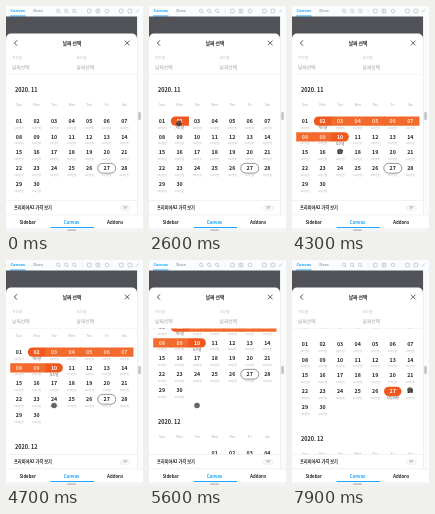
An HTML page with a canvas that plays this animation: 137x226 px, repeating every 8000 ms.

```html
<!DOCTYPE html>
<html lang="ko">
<head>
<meta charset="utf-8">
<style>
  html, body { margin: 0; width: 100%; height: 100%; overflow: hidden; background: #f6f8fb; }
  canvas { display: block; width: 137px; height: 226px; }
</style>
</head>
<body>
<canvas id="stage"></canvas>
<script>
const W = 137, H = 226, LOOP = 8000, STEP = 100;
const INK = '#222', MUTED = '#aaa', BLUE = '#1ea7fd', ORANGE = '#f0581f', RANGE = '#f26a2c';
const FONT = '"Noto Sans CJK KR", "Noto Sans CJK", "Noto Sans", sans-serif';
const UI_FONT = '"Open Sans", "Noto Sans", sans-serif';
const VIEW = { top: 68.5, bottom: 194.5 };
const ROW = 15.75, CELL = 17.55, LEFT = 4, RIGHT = 127.5;
const BAR_BOTTOM = 10.5, SHEET_TOP = 27.5;

const canvas = document.getElementById('stage');
const ctx = canvas.getContext('2d');
const ratio = window.devicePixelRatio || 1;
canvas.width = W * ratio;
canvas.height = H * ratio;

// Each key: time, then the values reached at that time.
const CURSOR = [
  [400, 3, 139], [700, 91, 118], [1000, 26, 92], [1300, 24, 91], [1600, 21, 67],
  [1900, 28, 122], [2100, 30, 117.5], [2600, 30, 117.5], [3100, 46, 131], [3200, 45, 131.5],
  [3400, 45, 131.5], [3700, 48, 145.5], [5900, 48, 145.5], [6300, 79, 131],
  [6600, 79, 131], [7000, 101, 131], [7600, 101, 131], [7900, 118, 130]
];
const SCROLL = [[4500, 0], [4700, 23], [4900, 46], [5200, 69], [5300, 71], [5400, 71], [5600, 48], [5800, 31]];

// Selected November days after each tap.
const TAPS = [[0], [2300, 2], [3400, 2, 10], [6500, 26], [7100, 26, 27], [7400, 27], [7600, 27, 27]];

function valueAt(keys, time) {
  if (time <= keys[0][0]) return keys[0].slice(1);
  const next = keys.findIndex(key => key[0] > time);
  if (next < 0) return keys[keys.length - 1].slice(1);
  const a = keys[next - 1], b = keys[next];
  const p = (time - a[0]) / (b[0] - a[0]);
  return a.slice(1).map((v, i) => v + (b[i + 1] - v) * p);
}

function text(str, x, y, size, color = INK, { weight = 400, align = 'center', font = FONT } = {}) {
  ctx.font = `${weight} ${size}px ${font}`;
  ctx.textAlign = align;
  ctx.textBaseline = 'alphabetic';
  ctx.fillStyle = color;
  ctx.fillText(str, x, y + size * 0.36);
}

function rect(x, y, w, h, color) {
  ctx.fillStyle = color;
  ctx.fillRect(x, y, w, h);
}

function box(x, y, w, h, radii, fill, stroke, width = 0.8) {
  ctx.beginPath();
  ctx.roundRect(x, y, w, h, radii);
  if (fill) { ctx.fillStyle = fill; ctx.fill(); }
  if (stroke) { ctx.strokeStyle = stroke; ctx.lineWidth = width; ctx.stroke(); }
}

function line(points, color, width = 0.8) {
  ctx.beginPath();
  points.forEach(([x, y]) => ctx.lineTo(x, y));
  ctx.strokeStyle = color;
  ctx.lineWidth = width;
  ctx.stroke();
}

function circle(x, y, r, fill, stroke) {
  ctx.beginPath();
  ctx.arc(x, y, r, 0, Math.PI * 2);
  if (fill) { ctx.fillStyle = fill; ctx.fill(); }
  if (stroke) { ctx.strokeStyle = stroke; ctx.lineWidth = 0.5; ctx.stroke(); }
}

function drawToolbar() {
  const gray = '#9ba4ac';
  rect(0, 0, W, BAR_BOTTOM, '#fafcfe');
  text('Canvas', 11.8, 5, 4.1, BLUE, { weight: 700, font: UI_FONT });
  rect(4, BAR_BOTTOM - 1, 15.5, 1, BLUE);
  text('Docs', 32, 5, 4.1, gray, { weight: 700, font: UI_FONT });
  for (const x of [52, 60, 68]) {
    circle(x, 4.7, 1.6, null, gray);
    line([[x + 1.2, 5.9], [x + 2.2, 6.9]], gray, 0.6);
  }
  line([[76, 2.5], [76, 7.5]], '#dde2e7', 0.5);
  for (const x of [81.5, 90, 113.5, 122]) box(x, 3.2, 3.7, 3.6, 0.5, null, gray, 0.5);
  line([[91.8, 3.2], [91.8, 6.8]], gray, 0.5);
  circle(101, 5, 1.8, null, gray);
  line([[130, 6.5], [133, 3.5]], gray, 0.6);
}

function drawSheet() {
  rect(0, BAR_BOTTOM, 131, 40, '#505258');
  box(0, SHEET_TOP, 131, 182, [5, 5, 0, 0], '#fff');
  rect(131, BAR_BOTTOM, 6, 199, '#fafbfc');
  rect(131, BAR_BOTTOM, 0.5, 199, '#dfe3e7');
  box(132.2, 106, 2.7, 8, 1, '#c2c5c8');

  line([[11, 34.3], [8.4, 37], [11, 39.7]], INK, 0.8);
  text('날짜 선택', 66, 37, 4.8, INK, { weight: 700 });
  line([[118.8, 34.6], [123.6, 39.4]], INK, 0.7);
  line([[123.6, 34.6], [118.8, 39.4]], INK, 0.7);

  const left = { align: 'left' };
  [['가는날', 6], ['오는날', 70.5]].forEach(([label, x]) => {
    text(label, x, 51.7, 3.7, '#b5b5b5', left);
    text('날짜선택', x, 61.3, 4.8, '#a4a4a4', left);
  });
  rect(0, 68.3, 131, 0.5, '#eee');
}

function drawFooter() {
  rect(0, 194.5, 131, 14.5, '#fff');
  rect(0, 194.5, 131, 0.5, '#e5e5e5');
  text('프리미어A2 가격 보기', 8, 201.5, 4.2, INK, { weight: 700, align: 'left' });
  box(114.5, 199.8, 9.5, 4.4, 2.2, '#fff', '#d0d0d0', 0.4);
  text('OFF', 119.3, 202, 2.8, '#777');

  rect(0, 209, W, 13.5, '#fff');
  rect(0, 208.7, W, 0.5, '#dfe3e7');
  const bold = { weight: 700, font: UI_FONT };
  text('Sidebar', 21.8, 216, 4.3, '#333', bold);
  text('Canvas', 65.5, 216, 4.3, BLUE, bold);
  text('Addons', 109, 216, 4.3, '#333', bold);
  rect(44.5, 221, 43.5, 1, BLUE);
  rect(0, 222.5, W, 3.5, '#f1f3f5');
  box(61, 223.3, 9, 1.6, 0.8, '#c2c5c8');
}

function drawSelectedCell(x, cy, color, roundLeft, roundRight) {
  const left = Math.max(LEFT, x - CELL / 2);
  // Square ends overlap the next cell so that no seam shows.
  const right = Math.min(RIGHT, x + CELL / 2 + (roundRight ? 0 : 0.6));
  const head = roundLeft ? 4.7 : 0, tail = roundRight ? 4.7 : 0;
  box(left, cy - 4.6, right - left, 9.4, [head, tail, tail, head], color);
}

function drawMonth({ title, y, firstColumn, days, today, selection = [] }) {
  const [start, end = start] = selection;
  const single = selection.length === 2 && start === end;
  text(title, 9, y, 5.5, INK, { weight: 700, align: 'left' });
  'Sun Mon Tue Wed Thu Fri Sat'.split(' ').forEach((name, i) =>
    text(name, 13 + i * CELL, y + 15.3, 3.2, MUTED));

  for (let day = 1; day <= days; day++) {
    const slot = firstColumn + day - 1;
    const x = 13 + slot % 7 * CELL, cy = y + 31.3 + Math.floor(slot / 7) * ROW;
    const selected = day >= start && day <= end;
    const edge = day === start || day === end;
    if (selected) {
      drawSelectedCell(x, cy, edge ? ORANGE : RANGE, day === start, single || (day === end && end !== start));
    } else if (day === today) {
      box(x - 9, cy - 4.9, 18, 9.8, 4.9, '#fff', '#666', 0.7);
    }
    const color = selected ? (edge ? '#fff' : '#ffe0cf') : INK;
    text(String(day).padStart(2, '0'), x, cy, 5.3, color, { weight: 700 });
    const note = single && selected ? '당일여행' : day === start ? '가는날' : day === end ? '오는날' : '';
    text(note || '100만원', x, cy + 6.7, note ? 3.2 : 2.7, note ? '#444' : '#b0b0b0');
  }
}

function drawCalendar(time) {
  const [scroll] = valueAt(SCROLL, time);
  const selection = TAPS.filter(tap => tap[0] <= time).pop().slice(1);
  ctx.save();
  ctx.beginPath();
  ctx.rect(0, VIEW.top, 131, VIEW.bottom - VIEW.top);
  ctx.clip();
  drawMonth({ title: '2020. 11', y: 83.7 - scroll, firstColumn: 0, days: 30, today: 27, selection });
  drawMonth({ title: '2020. 12', y: 209.6 - scroll, firstColumn: 3, days: 31 });
  ctx.restore();
}

function draw(now) {
  const time = Math.floor((now % LOOP) / STEP) * STEP;
  ctx.setTransform(ratio, 0, 0, ratio, 0, 0);
  rect(0, 0, W, H, '#f6f8fb');
  drawToolbar();
  drawSheet();
  drawCalendar(time);
  drawFooter();
  if (time >= CURSOR[0][0]) {
    const [x, y] = valueAt(CURSOR, time);
    circle(x, y, 2.8, 'rgba(50, 50, 50, 0.75)');
  }
}

const origin = performance.now();
function tick() {
  draw(performance.now() - origin);
  requestAnimationFrame(tick);
}
tick();
</script>
</body>
</html>
```
